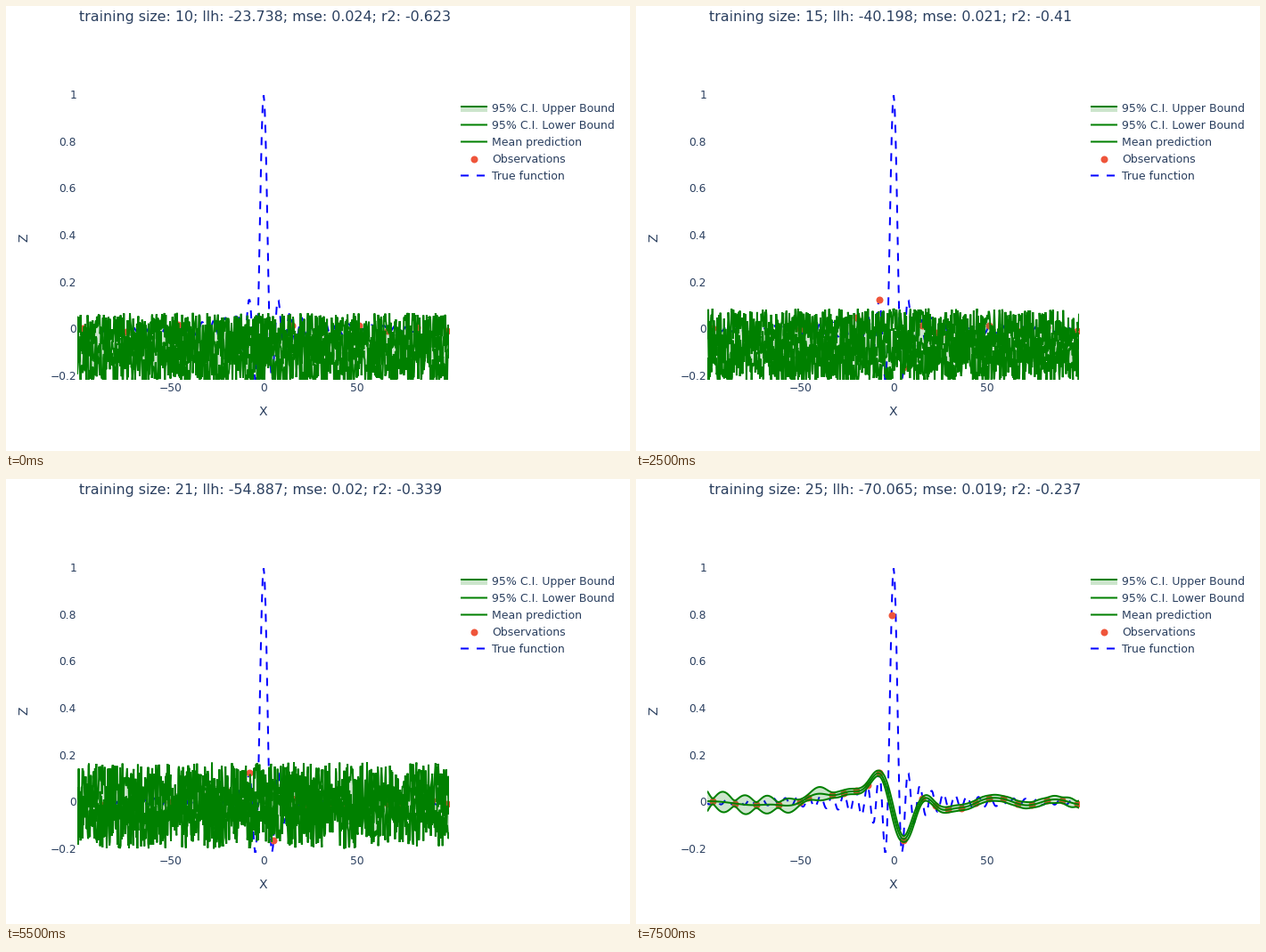
A matplotlib script that plays this animation: 700x500 px, repeating every 8 s.

```python
import numpy as np
import matplotlib.pyplot as plt
from matplotlib.animation import FuncAnimation
from matplotlib.patches import Polygon, Rectangle

PX = 0.72  # points per pixel at 100 dpi
INK, RED, GREEN, BLUE = "#2a3f5f", "#EF553B", "#008000", "#0000ff"
DASH = (0, (4.5, 4.5))
plt.rcParams.update({"font.family": "DejaVu Sans", "path.simplify": False})

START, STOP = 10, 25  # training sizes
xs = np.arange(-100, 99.6, 0.25)
N = len(xs)


def true_fn(x):
    return np.sinc(np.asarray(x) / np.pi)


def sample_order():
    """Sampling positions in the order they join the training set."""
    j = np.arange(12)
    left = np.linspace(-97.1, -50.2, 5)
    mid = 5.26 - 6.4 * j[:7]
    right = 15.5 + 6.8 * j + 0.068 * j**2
    first = np.r_[-46, left[::2], right[0], right[3::2]]
    rest = np.r_[right[1], right[2::2], left[1::2]]
    return np.r_[first, mid[4::-4], rest[:2], mid[2::4], rest[2:], mid[5::-2]]


OBS = sample_order()


def rough_band(size, hi, lo, power):
    """Densely oscillating mean and bounds between lo and hi."""
    rng = np.random.default_rng(size)
    mid, half = (hi + lo) / 2, (hi - lo) / 2

    def spikes():
        a, b = rng.uniform(0, 2 * np.pi, 2)
        beat = np.exp(0.4 * (np.sin(1.1 * xs + a) + np.sin(0.37 * xs + b)))
        return half * rng.random(N) ** (power * beat)

    mean = mid + 0.5 * half * rng.uniform(-1, 1, N)
    return mean, mid - spikes(), mid + spikes()


def comb_band(size, width=0.093):
    """Flat band that collapses at many narrow places."""
    rng = np.random.default_rng(size)
    mean, dev = np.zeros(N), np.full(N, width)
    dips = rng.random(N) < 0.1
    dev[dips] *= rng.uniform(0, 0.75, dips.sum())
    jumps = rng.choice(N, 13, replace=False)
    mean[jumps] = rng.choice([-1, -1, 1], 13) * rng.uniform(0.02, 0.09, 13)
    dev[jumps] = width
    at = np.searchsorted(xs, OBS[:size])
    mean[at], dev[at] = true_fn(OBS[:size]), 0.012
    return mean, mean - dev, mean + dev


def smooth_band(size, length=8.3, amp=0.07, noise=0.0065):
    """Gaussian process regression with an RBF kernel."""
    def kernel(a, b):
        return amp**2 * np.exp(-(a[:, None] - b[None]) ** 2 / (2 * length**2))

    x = OBS[:size]
    cov = kernel(x, x) + noise**2 * np.eye(size)
    cross = kernel(xs, x)
    gain = np.linalg.solve(cov, cross.T).T
    mean = gain @ true_fn(x)
    dev = 1.96 * np.sqrt(np.maximum(amp**2 - (gain * cross).sum(1), 0))
    return mean, mean - dev, mean + dev


# Each refit: first training size -> (r2, band)
FITS = {
    10: (-0.623, rough_band(10, 0.07, -0.235, 1.1)),
    12: (-0.208, rough_band(12, 0.115, -0.2, 1.5)),
    13: (-0.41, rough_band(13, 0.088, -0.235, 1.1)),
    18: (-0.194, rough_band(18, 0.177, -0.2, 1.5)),
    19: (-0.339, rough_band(19, 0.17, -0.2, 1.5)),
    22: (-0.025, comb_band(22)),
    24: (-0.237, smooth_band(24)),
}


def log_likelihood(size):
    return np.interp(size, [10, 12, 15, 18, 20, 22, 25],
                     [-23.738, -30.362, -40.198, -42.301,
                      -51.323, -58.451, -70.065])


fig = plt.figure(figsize=(7, 5), dpi=100, facecolor="white")
stage = fig.add_axes([0, 0, 1, 1])
stage.set(xlim=(0, 700), ylim=(500, 0))
stage.axis("off")
ax = fig.add_axes([80 / 700, 80 / 500, 417 / 700, 320 / 500])
ax.set(xlim=(-100, 99.5), ylim=(-0.2172, 1))
ax.axis("off")


def label(x, y, s, size=12.3, **kw):
    kw.setdefault("va", "baseline")
    s = s.replace("-", "\u2212") if size < 13 else s
    return stage.text(x, y, s, fontsize=size * PX, color=INK, **kw)


def curve(axes, x, y, color=GREEN, z=4, **kw):
    return axes.plot(x, y, color=color, lw=2 * PX, zorder=z, snap=False,
                     solid_joinstyle="bevel", solid_capstyle="butt", **kw)[0]


def dots(axes, x, y):
    return axes.plot(x, y, "o", color=RED, ms=8 * PX, mew=0, zorder=2)[0]


# Axis labels
for v in (-50, 0, 50):
    label(289 + 2.09 * v, 433, f"{v}", ha="center")
for v in np.arange(-1, 6) / 5:
    label(79, 367.2 - 262.9 * v, f"{v:g}", ha="right")
label(288.5, 460, "X", 14, ha="center")
label(20, 260, "Z", 14, ha="center", va="center", rotation=90)

# Legend
names = ("95% C.I. Upper Bound", "95% C.I. Lower Bound", "Mean prediction",
         "Observations", "True function")
for i, name in enumerate(names):
    label(545, 119.2 + 19 * i, name, 12.5)
stage.add_patch(Rectangle((510, 113), 30, 6, fc=GREEN, alpha=0.2, lw=0))
for y in (113, 133.5, 152.5):
    curve(stage, [510, 540], [y, y])
dots(stage, [525], [171.5])
curve(stage, [510, 540], [190.5, 190.5], BLUE, ls=DASH)

# Plot
title = label(82, 17, "", 15.84)
curve(ax, xs[::2], true_fn(xs[::2]), BLUE, 1, ls=DASH, dash_joinstyle="bevel")
seen = dots(ax, [], [])
fill = ax.add_patch(Polygon([(0, 0), (0, 0), (0, 0)], fc=GREEN, alpha=0.2,
                            lw=0, zorder=3))
lines = [curve(ax, [], []) for _ in range(3)]


def update(i):
    size = START + i
    r2, band = FITS[max(k for k in FITS if k <= size)]
    mse = round(0.015 * (1 - r2), 3)
    title.set_text(f"training size: {size}; llh: {log_likelihood(size):.3f}; "
                   f"mse: {mse:g}; r2: {r2:g}")
    x = OBS[:size]
    seen.set_data(x, true_fn(x))
    for line, y in zip(lines, band):
        line.set_data(xs, y)
    _, low, up = band
    fill.set_xy(np.column_stack([np.r_[xs, xs[::-1]], np.r_[up, low[::-1]]]))
    return [title, seen, fill, *lines]


anim = FuncAnimation(fig, update, frames=STOP - START + 1, interval=500,
                     repeat=True, repeat_delay=0, blit=False)
plt.show()
```
